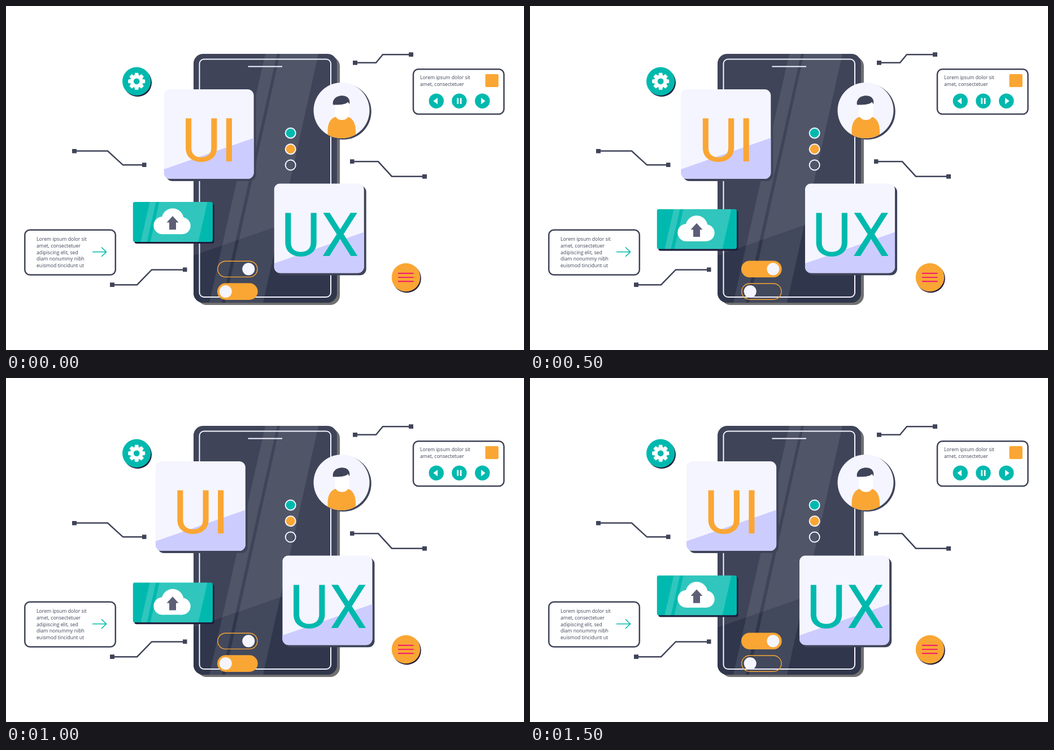
Write an HTML page that moves like this. It is 917 by 611 pixels and loops after 1600 ms.

```html
<!DOCTYPE html>
<html lang="en">
<head>
<meta charset="utf-8">
<title>UI and UX</title>
<style>
  html, body { margin: 0; width: 100%; height: 100%; overflow: hidden; background: #fff; }
  svg { display: block; width: 100%; height: 100%; }
  .ink { fill: #3f4459; }
  .navy { fill: #211d3b; }
  .teal { fill: #00b9ae; }
  .gold { fill: #faa634; }
  .pale { fill: #f5f5ff; }
  .lilac { fill: #cdccff; }
  .white { fill: #fff; }
  .line { fill: none; stroke: #3f4459; stroke-width: 2.5; }
  .rim { fill: none; stroke: #f5f5ff; stroke-width: 2; }
  .note { font: 8.7px "Open Sans", "Noto Sans", sans-serif; fill: #3f4459; }
  .big { font: 107.5px Roboto, Arial, sans-serif; }
  .track { stroke: #faa634; stroke-width: 1.4; }
</style>
</head>
<body>
<svg viewBox="0 0 917 611">
  <defs>
    <marker id="node" markerUnits="userSpaceOnUse" markerWidth="8" markerHeight="8" refX="4" refY="4">
      <rect class="ink" width="8" height="8"/>
    </marker>
    <clipPath id="face"><rect x="332" y="85" width="254" height="442" rx="17"/></clipPath>
    <clipPath id="tile"><rect width="159.2" height="159" rx="11"/></clipPath>
    <clipPath id="badge"><rect width="141.5" height="71" rx="4"/></clipPath>
    <clipPath id="portrait"><circle cx="594" cy="185.5" r="49.5"/></clipPath>
    <g id="card">
      <rect class="ink" x="4" y="4" width="159.2" height="159" rx="11"/>
      <g clip-path="url(#tile)">
        <rect class="pale" width="160" height="160"/>
        <path class="lilac" d="M0 142L160 86V160H0z"/>
      </g>
    </g>
  </defs>

  <!-- phone -->
  <rect x="338" y="90" width="253" height="441" rx="17" fill="#707070"/>
  <g clip-path="url(#face)">
    <rect class="ink" x="332" y="85" width="254" height="442"/>
    <path fill="#30374c" d="M332 443L586 354V527H332z"/>
    <path class="white" opacity=".09" d="M459 85H480L382 527H360zM485 85H553L455 527H388z"/>
  </g>
  <rect class="rim" x="342.5" y="94.5" width="232.5" height="422.5" rx="8"/>
  <path class="rim" d="M428.5 107.5H489"/>
  <g class="rim">
    <circle class="teal" cx="503.7" cy="225.7" r="9"/>
    <circle class="gold" cx="503.7" cy="254.2" r="9"/>
    <circle cx="503.7" cy="282.5" r="9"/>
  </g>
  <g id="toggles">
    <rect class="track" x="374.7" y="453.2" width="70.3" height="28.2" rx="14.1"/>
    <circle class="pale" cx="429.3" cy="467.3" r="11"/>
    <rect class="track" x="374.7" y="493" width="70.3" height="28.2" rx="14.1"/>
    <circle class="pale" cx="389" cy="507.1" r="11"/>
  </g>

  <!-- connectors -->
  <g class="line" marker-start="url(#node)">
    <path marker-start="url(#node)" marker-end="url(#node)" d="M618 100.7H655L667 86.3H717"/>
    <path marker-start="url(#node)" marker-end="url(#node)" d="M121 257.5H180L207 282.3H244.5"/>
    <path marker-start="url(#node)" marker-end="url(#node)" d="M612.5 276.3H659L683 302.7H741"/>
    <path marker-start="url(#node)" marker-end="url(#node)" d="M188 495.2H232L258 468.4H316.5"/>
  </g>

  <!-- settings button -->
  <circle class="navy" cx="233" cy="136" r="25"/>
  <circle class="teal" cx="231.2" cy="133.8" r="25.2"/>
  <g transform="translate(231.2 133.8)">
    <g id="teeth" class="white"></g>
    <circle r="8.4" fill="none" stroke="#fff" stroke-width="6"/>
  </g>

  <!-- menu button -->
  <circle class="navy" cx="709.5" cy="484" r="25.3"/>
  <circle class="gold" cx="708" cy="482" r="25.3"/>
  <path stroke="#f0246c" stroke-width="2.2" d="M694 474.8H721.5M694 482H721.5M694 489.2H721.5"/>

  <!-- player panel -->
  <rect class="line" x="721" y="112.2" width="160.5" height="79.8" rx="9"/>
  <text class="note"><tspan x="733" y="130">Lorem ipsum dolor sit</tspan><tspan x="733" y="141.8">amet, consectetuer</tspan></text>
  <rect class="gold" x="848.5" y="121" width="23.3" height="23" rx="2"/>
  <g class="teal">
    <circle cx="761.8" cy="168.7" r="13.2"/>
    <circle cx="802.4" cy="168.7" r="13.2"/>
    <circle cx="843.3" cy="168.7" r="13.2"/>
  </g>
  <path class="white" d="M756.5 168.7L764 163V174.4zM848.5 168.7L841 163V174.4zM798.3 163.5h2.8v10.4h-2.8zM803.7 163.5h2.8v10.4h-2.8z"/>

  <!-- text panel -->
  <rect class="line" x="33.3" y="397.8" width="160.5" height="79.8" rx="9"/>
  <text class="note"><tspan x="54" y="417">Lorem ipsum dolor sit</tspan><tspan x="54" y="428.8">amet, consectetuer</tspan><tspan x="54" y="440.6">adipiscing elit, sed</tspan><tspan x="54" y="452.4">diam nonummy nibh</tspan><tspan x="54" y="464.2">euismod tincidunt ut</tspan></text>
  <path fill="none" stroke="#00b9ae" stroke-width="1.6" d="M153 436.8H177.5M169 428.5L177.5 436.8L169 445"/>

  <!-- avatar -->
  <circle class="ink" cx="597" cy="187.5" r="49.7"/>
  <circle class="pale" cx="594" cy="185.5" r="49.5"/>
  <g clip-path="url(#portrait)">
    <path class="gold" d="M569.5 240V220C570 205 577 197 588 196H601C612 197 618.500 206 619 220V240z"/>
    <path class="white" d="M582 172H607.500V189C607.500 198 602 202.500 594.700 202.500S582 198 582 189z"/>
    <path class="ink" d="M579 175.500C577 166 585 159.300 595 159.300C604 159.300 610 165 608 174.500L605.500 170.500C600 175.500 590 175.500 579 175.500z"/>
  </g>

  <!-- moving cards -->
  <g id="ui">
    <use href="#card" x="279.4" y="148"/>
    <text class="big gold" x="310.7 380.2" y="276">UI</text>
  </g>
  <g id="ux">
    <use href="#card" x="474.5" y="315.300"/>
    <text class="big teal" x="487 557.800" y="443.500">UX</text>
  </g>
  <g id="upload">
    <g transform="translate(224.500 348)">
      <rect class="navy" x="2.700" y="3" width="141.500" height="71" rx="4"/>
      <g clip-path="url(#badge)">
        <rect class="teal" width="142" height="71"/>
        <path class="white" opacity=".19" d="M30 0H41L25 71H14zM47 0H132L116 71H31z"/>
      </g>
    </g>
    <g class="white">
      <circle cx="276.800" cy="389.800" r="15.500"/>
      <circle cx="295" cy="379" r="19.500"/>
      <circle cx="311.700" cy="390.300" r="15"/>
      <rect x="276.800" y="384" width="35" height="21.300"/>
    </g>
    <path fill="#5c5f76" d="M295 373L305.500 384.500H301V397.300H289V384.500H284.500z"/>
  </g>
</svg>
<script>
  const LOOP = 1600, STEP = 100, TRAVEL = 19.7;
  const el = id => document.getElementById(id);
  const move = (id, x, y) => el(id).setAttribute("transform", `translate(${x} ${y})`);
  const [topTrack, topKnob, lowTrack, lowKnob] = el("toggles").children;

  for (let angle = 0; angle < 360; angle += 45)
    el("teeth").innerHTML += `<path transform="rotate(${angle})" d="M-4 -9L-3 -15H3L4 -9z"/>`;

  function draw(now) {
    const time = Math.floor(now % LOOP / STEP) * STEP;
    const swing = TRAVEL * (1 - Math.abs(1 - time / (LOOP / 2)));
    move("ui", -swing, 0);
    move("ux", swing, 0);
    move("upload", 0, swing * 1.03);

    const topOn = time % 800 >= 400;
    topTrack.style.fill = topOn ? "#faa634" : "none";
    lowTrack.style.fill = topOn ? "none" : "#faa634";
    topKnob.setAttribute("cx", topOn ? 430.3 : 429.3);
    lowKnob.setAttribute("cx", topOn ? 389.7 : 388.8);
    requestAnimationFrame(draw);
  }
  draw(performance.now());
</script>
</body>
</html>
```
